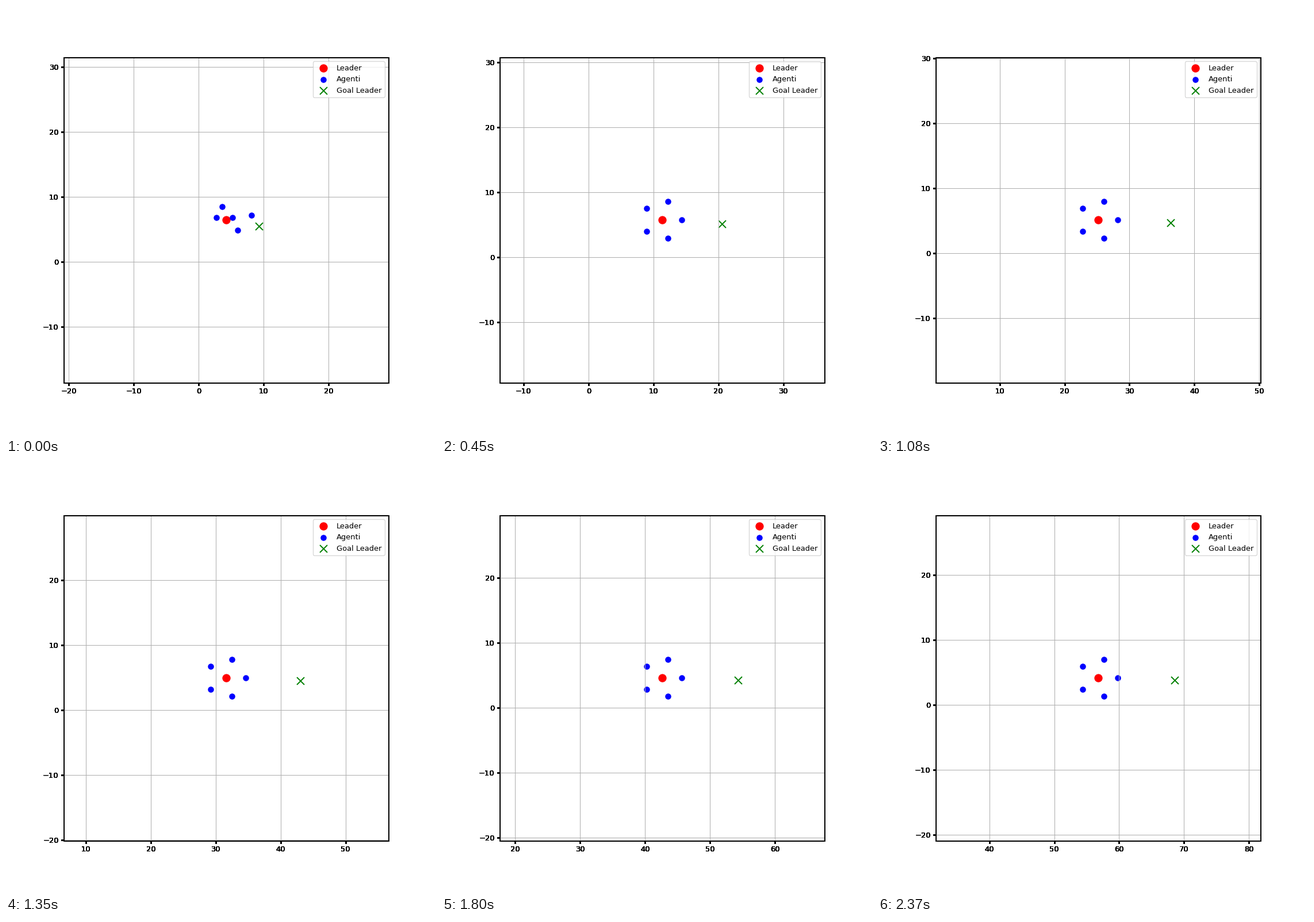
Animation of 748 by 748 pixels, one loop 2400 ms. Source, as a matplotlib script:

```python
import numpy as np
import matplotlib.pyplot as plt
from matplotlib.animation import FuncAnimation
from matplotlib.ticker import MultipleLocator

SIZE = 748
FRAMES = 80
VIEW = 25            # half width of the view around the leader

CENTRE = np.array([382.97, 375.75])    # plot centre in pixels
SIDE = 564.65
THICK = 3 * 72 / (SIZE / 8)            # three pixels in points

GOAL = np.array([9.32, 5.519])
GOAL_STEP = np.array([0.75, -0.0218])
LAG_START = np.array([5.08, -0.91])
LAG_END = np.array([11.85, -0.344])
LEADER_DECAY = 0.939
AGENT_DECAY = 0.7

angles = np.arange(5) * 2 * np.pi / 5
RING = 3 * np.column_stack([np.cos(angles), np.sin(angles)])
START = np.array([[3.9, 0.73], [-0.58, 2.08], [-1.49, 0.4],
                  [1.0, 0.4], [1.75, -1.58]])

plt.rcParams["font.family"] = "DejaVu Sans"
fig = plt.figure(figsize=(8, 8), dpi=SIZE / 8)
box = [*(CENTRE - SIDE / 2) / SIZE, SIDE / SIZE, SIDE / SIZE]
ax = fig.add_axes(box)
ax.xaxis.set_major_locator(MultipleLocator(10))
ax.yaxis.set_major_locator(MultipleLocator(10))
ax.grid(True)

# Stacked layers harden the tick text and the outer side of the border;
# the white patch of the main axes hides their inner side
for _ in range(7):
    layer = fig.add_axes(box, sharex=ax, sharey=ax, zorder=-1)
    layer.tick_params(width=THICK)
    for spine in layer.spines.values():
        spine.set_linewidth(THICK)

leader_dot = ax.scatter([0], [0], c="red", s=100, label="Leader")
agent_dots = ax.scatter(*START.T, c="blue", s=50, label="Agenti")
goal_mark = ax.scatter([0], [0], c="green", s=100, marker="x",
                       label="Goal Leader")
ax.legend(loc="upper right")


def update(n):
    goal = GOAL + GOAL_STEP * n
    lag = LAG_END + (LAG_START - LAG_END) * LEADER_DECAY ** n
    leader = goal - lag
    agents = leader + RING + (START - RING) * AGENT_DECAY ** n
    leader_dot.set_offsets([leader])
    agent_dots.set_offsets(agents)
    goal_mark.set_offsets([goal])
    ax.set_xlim(leader[0] - VIEW, leader[0] + VIEW)
    ax.set_ylim(leader[1] - VIEW, leader[1] + VIEW)
    return leader_dot, agent_dots, goal_mark


anim = FuncAnimation(fig, update, frames=FRAMES, interval=30,
                     repeat=True, repeat_delay=0, blit=False)
plt.show()
```
